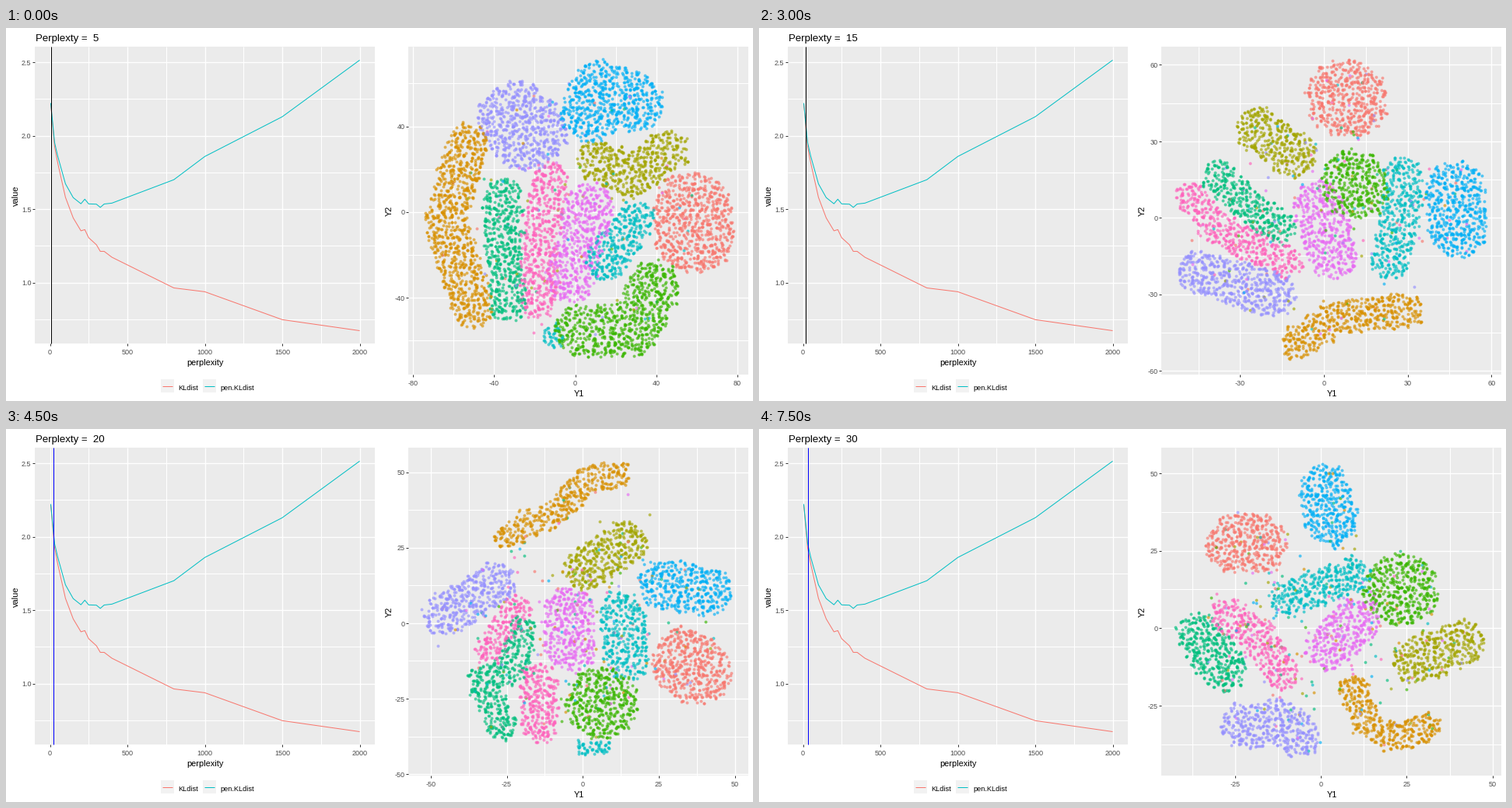
Animation of 960 by 480 pixels, one loop 8 s. Source, as a matplotlib script:

```python
import numpy as np
import matplotlib.pyplot as plt
from matplotlib.animation import FuncAnimation
from matplotlib.colors import to_rgba
from matplotlib.patches import Rectangle

W, H, DPI = 960, 480, 100
PX = 72 / DPI                      # points per pixel
STEP_MS, HOLD, FRAMES = 500, 3, 16
CELL = 5.3                         # mean spacing of neighbours in a cluster

RED, ORANGE, OLIVE, GREEN, JADE, TEAL, BLUE, VIOLET, MAGENTA, PINK = range(10)
HUES = ["#F8766D", "#D89000", "#A3A500", "#39B600", "#00BF7D",
        "#00BFC4", "#00B0F6", "#9590FF", "#E76BF3", "#FF62BC"]
DOT_RGBA = np.array([to_rgba(c, 0.55) for c in HUES])

plt.rcParams["font.family"] = "Liberation Sans"
fig = plt.figure(figsize=(W / DPI, H / DPI), dpi=DPI, facecolor="white")
ax = fig.add_axes([0, 0, 1, 1])

# Divergence by perplexity; the penalty is log(n)/n per unit with n = 10000.
PERP = np.array([5, 30, 50, 100, 150, 200, 225, 250, 300, 325, 350, 400,
                 800, 1000, 1500, 2000])
KL = np.array([2.217, 1.925, 1.815, 1.58, 1.44, 1.352, 1.36, 1.305, 1.257,
               1.212, 1.212, 1.172, 0.963, 0.937, 0.747, 0.672])
PEN = KL + np.log(1e4) / 1e4 * PERP

# Panels: left, top, width, height in pixels.
CURVE_BOX = (37, 24, 437, 382)
CLOUD_BOX = (517, 24, 437, 422)

# Axes: pixel of zero, pixels per unit, major step.
CURVE_X, CURVE_Y = (56, 0.199, 500), (516, -189, 0.5)
CLOUD_AXES = [
    ((731, 2.607, 40), (236.2, -2.755, 40)),
    ((735.6, 3.06, 40), (241, -3.13, 30)),
    ((725.5, 3.585, 30), (243.7, -3.28, 30)),
    ((740.7, 3.906, 25), (249.4, -3.885, 25)),
    ((727.8, 3.843, 30), (216.6, -4.145, 25)),
    ((721.6, 4.415, 25), (255.8, -3.985, 25)),
]

scenes = [[] for _ in CLOUD_AXES]


def blob(k, hue, radius, *spine):
    """A cluster is every place within a radius of a short spine."""
    scenes[k].append((hue, radius, np.array(spine, float)))


blob(0, RED, 50, (882, 232), (884, 266))
blob(0, TEAL, 25, (808, 247), (772, 300))
blob(0, TEAL, 13, (701, 394), (703, 400))
blob(0, GREEN, 33, (832, 332), (805, 390), (738, 390))
blob(0, OLIVE, 27, (760, 170), (805, 192), (850, 158))
blob(0, BLUE, 39, (752, 108), (762, 82), (805, 95))
blob(0, VIOLET, 49, (655, 118), (670, 135))
blob(0, ORANGE, 27, (592, 150), (565, 250), (600, 360))
blob(0, JADE, 24, (637, 215), (640, 280), (645, 355))
blob(0, PINK, 24, (700, 195), (686, 270), (685, 350))
blob(0, MAGENTA, 31, (748, 230), (738, 270), (725, 322))

blob(1, GREEN, 53, (740, 93), (745, 99))
blob(1, OLIVE, 33, (650, 134), (641, 192))
blob(1, ORANGE, 26, (563, 200), (585, 246), (665, 267))
blob(1, MAGENTA, 30, (722, 167), (705, 224))
blob(1, TEAL, 27, (798, 137), (768, 222))
blob(1, VIOLET, 34, (850, 205), (824, 264))
blob(1, RED, 25, (910, 255), (890, 292), (842, 348))
blob(1, PINK, 25, (735, 272), (780, 295), (791, 344))
blob(1, JADE, 29, (716, 306), (758, 376))
blob(1, BLUE, 26, (628, 325), (665, 355), (696, 401))

blob(2, RED, 48, (752, 89), (760, 92))
blob(2, OLIVE, 29, (641, 131), (688, 164))
blob(2, GREEN, 43, (764, 200), (768, 203))
blob(2, JADE, 22, (590, 192), (625, 225), (668, 255))
blob(2, PINK, 20, (556, 218), (585, 255), (680, 302))
blob(2, TEAL, 25, (828, 191), (825, 240), (812, 298))
blob(2, BLUE, 38, (896, 210), (898, 257))
blob(2, MAGENTA, 32, (718, 230), (738, 290))
blob(2, VIOLET, 28, (565, 314), (660, 343))
blob(2, ORANGE, 21, (690, 405), (740, 372), (833, 362))

blob(3, ORANGE, 17, (642, 137), (705, 107), (750, 62), (785, 58))
blob(3, OLIVE, 28, (795, 147), (744, 178))
blob(3, VIOLET, 27, (628, 198), (563, 240))
blob(3, BLUE, 32, (845, 199), (900, 209))
blob(3, MAGENTA, 32, (722, 234), (726, 278))
blob(3, TEAL, 28, (791, 236), (799, 293))
blob(3, TEAL, 9, (742, 410), (770, 410))
blob(3, RED, 44, (874, 299), (888, 311))
blob(3, GREEN, 45, (764, 351), (768, 354))
blob(3, PINK, 19, (655, 233), (622, 282))
blob(3, PINK, 24, (685, 326), (685, 380))
blob(3, JADE, 19, (663, 262), (655, 305), (612, 325), (637, 380))

blob(4, RED, 47, (832, 101), (834, 107))
blob(4, GREEN, 41, (717, 88), (721, 112))
blob(4, OLIVE, 33, (640, 96), (634, 149))
blob(4, ORANGE, 22, (556, 156), (572, 220), (596, 288))
blob(4, MAGENTA, 33, (710, 187), (677, 230))
blob(4, TEAL, 28, (762, 142), (766, 185), (775, 221))
blob(4, BLUE, 27, (841, 209), (910, 211))
blob(4, JADE, 17, (712, 269), (728, 268))
blob(4, JADE, 23, (766, 312), (768, 352), (822, 350))
blob(4, PINK, 21, (706, 305), (745, 318), (818, 292))
blob(4, VIOLET, 23, (668, 318), (685, 375), (717, 402))

blob(5, BLUE, 34, (726, 79), (735, 118))
blob(5, RED, 38, (611, 147), (638, 146))
blob(5, TEAL, 23, (678, 218), (735, 197), (761, 187))
blob(5, GREEN, 46, (823, 205), (828, 208))
blob(5, JADE, 29, (565, 264), (597, 309))
blob(5, PINK, 22, (602, 238), (640, 265), (672, 313))
blob(5, MAGENTA, 30, (769, 246), (730, 282))
blob(5, OLIVE, 29, (842, 298), (903, 275))
blob(5, ORANGE, 19, (764, 335), (775, 370), (810, 397), (856, 384))
blob(5, VIOLET, 28, (622, 382), (668, 377), (692, 395))


def spine_distance(pts, spine):
    dist = np.full(len(pts), np.inf)
    for a, b in zip(spine, spine[1:]):
        t = np.clip((pts - a) @ (b - a) / ((b - a) @ (b - a)), 0, 1)
        dist = np.minimum(dist, np.linalg.norm(pts - a - t[:, None] * (b - a), axis=1))
    return dist


def fill(rng, radius, spine):
    """Evenly spread places, each holding a tight knot of dots."""
    (x0, y0), (x1, y1) = spine.min(0) - radius, spine.max(0) + radius
    gx, gy = np.meshgrid(np.arange(x0, x1, CELL), np.arange(y0, y1, CELL))
    pts = np.column_stack([gx.ravel(), gy.ravel()])
    pts += rng.uniform(-CELL / 2, CELL / 2, pts.shape)
    rim = radius + rng.normal(0, 1.5, len(pts))
    pts = pts[spine_distance(pts, spine) < rim]
    pts = np.repeat(pts, rng.integers(1, 4, len(pts)), axis=0)
    return pts + rng.normal(0, 0.9, pts.shape)


def make_cloud(k):
    rng = np.random.default_rng(40 + k)
    parts = []
    for hue, radius, spine in scenes[k]:
        pts = fill(rng, radius, spine)
        parts.append(np.column_stack([pts, np.full(len(pts), hue)]))
    pts = np.vstack(parts)
    # Strays lean from one class toward another.
    n = 90 + 25 * k
    a, b = pts[rng.integers(len(pts), size=(2, n)), :2]
    spots = a + rng.uniform(0, 0.35, (n, 1)) * (b - a) + rng.normal(0, 4, (n, 2))
    strays = np.column_stack([spots, rng.integers(10, size=n)])
    pts = rng.permutation(np.vstack([pts, strays]))
    return np.round(pts[:, :2]), pts[:, 2].astype(int)


clouds = [make_cloud(k) for k in range(len(scenes))]


def line(x, y, color, width=1.0, z=4):
    ax.plot(x, y, color=color, lw=width * PX, zorder=z, solid_capstyle="butt")


def rect(x, y, w, h, color):
    ax.add_patch(Rectangle((x - 0.5, y - 0.5), w, h, fc=color, ec="none", zorder=1))


def text(x, y, s, size, color="black", **kw):
    ax.text(x, y, s, fontsize=size * PX, color=color, zorder=5, **kw)


def ticks(axis, lo, hi):
    zero, unit, step = axis
    for n in range(-20, 21):
        v = n * step / 2
        pos = zero + v * unit
        if lo <= pos <= hi:
            yield pos, v, n % 2 == 0


def panel(box, xaxis, yaxis, xname, yname, yfmt, name_x):
    x, y, w, h = box
    right, bottom = x + w - 1, y + h - 1
    rect(x, y, w, h, "#EBEBEB")
    for p, v, major in ticks(xaxis, x, right):
        line([p, p], [y - 0.5, bottom + 0.5], "white", 1.4 if major else 1, 2)
        if major:
            line([p, p], [bottom + 0.5, bottom + 3.5], "#333333")
            text(p, bottom + 14.5, f"{v:.0f}", 9, "#4D4D4D", ha="center")
    for p, v, major in ticks(yaxis, y, bottom):
        line([x - 0.5, right + 0.5], [p, p], "white", 1.4 if major else 1, 2)
        if major:
            line([x - 3.5, x - 0.5], [p, p], "#333333")
            text(x - 5, p + 3.7, format(v, yfmt), 9, "#4D4D4D", ha="right")
    text(x + w / 2, bottom + 29, xname, 11, ha="center")
    text(name_x, y + h / 2, yname, 11, ha="center", va="center", rotation=90)


def legend(x, color, name):
    rect(x, 452, 17, 17, "#F2F2F2")
    line([x + 1.5, x + 14.5], [460, 460], color)
    text(x + 21.5, 465, name, 9.2)


def draw(i):
    k = i // HOLD
    perplexity = 5 * (k + 1)
    ax.clear()
    ax.axis("off")
    ax.set_xlim(-0.5, W - 0.5)
    ax.set_ylim(H - 0.5, -0.5)

    panel(CURVE_BOX, CURVE_X, CURVE_Y, "perplexity", "value", ".1f", 12)
    to_x = CURVE_X[0] + PERP * CURVE_X[1]
    for vals, color in ((KL, HUES[RED]), (PEN, HUES[TEAL])):
        line(to_x, CURVE_Y[0] + vals * CURVE_Y[1], color)
    mark = round(CURVE_X[0] + perplexity * CURVE_X[1])
    line([mark, mark], [23.5, 405.5], "blue" if k % 2 else "black")
    text(37, 17, f"Perplexty =  {perplexity}", 13.2)
    legend(199, HUES[RED], "KLdist")
    legend(253, HUES[TEAL], "pen.KLdist")

    panel(CLOUD_BOX, *CLOUD_AXES[k], "Y1", "Y2", ".0f", 492)
    spots, hue = clouds[k]
    rgba = DOT_RGBA[hue]
    ax.scatter(*spots.T, s=(3 * PX) ** 2, facecolors=rgba, edgecolors=rgba,
               linewidths=PX, zorder=3)
    return []


anim = FuncAnimation(fig, draw, frames=FRAMES, interval=STEP_MS,
                     init_func=lambda: draw(0), repeat=True, cache_frame_data=False)
plt.show()
```
